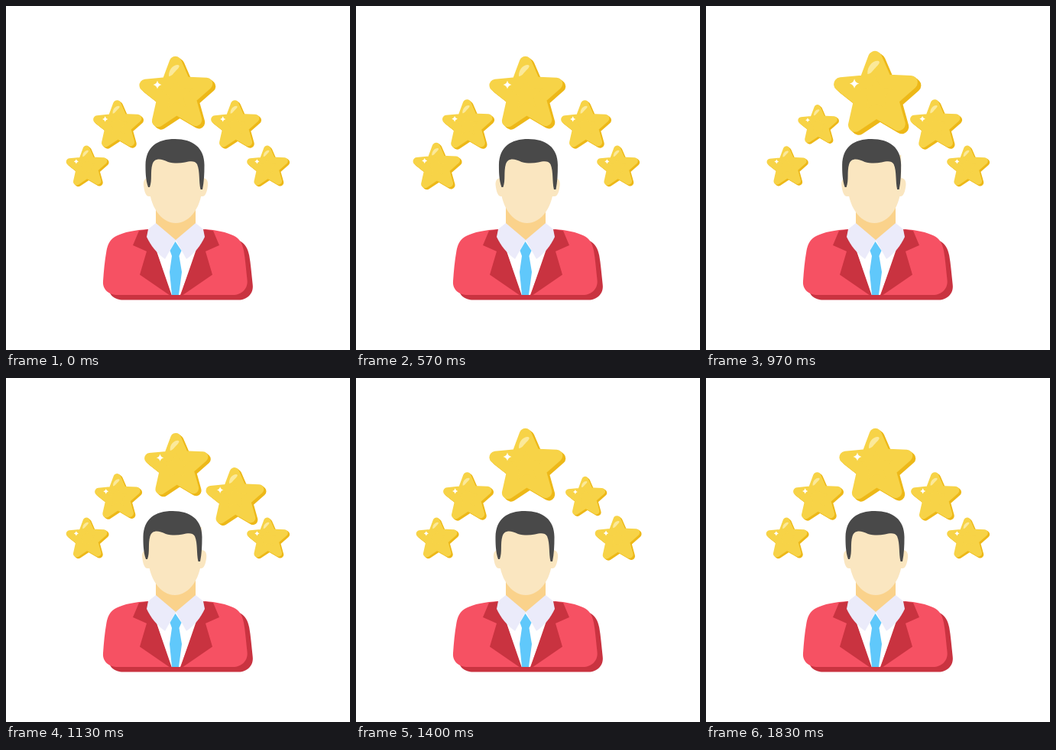
Write an HTML page that moves like this. It is 450 px wide and 450 px high and loops after 2 s.

```html
<!DOCTYPE html>
<html lang="en">
<head>
<meta charset="utf-8">
<title>Five star person</title>
<style>
  html, body { margin: 0; width: 100%; height: 100%; overflow: hidden; background: #fff; }
  svg { display: block; width: 100vw; height: 100vh; }
</style>
</head>
<body>
<svg viewBox="0 0 450 450">
  <defs>
    <path id="coat" d="M187 292C168 293 154 296 145 300.500C137 304.500 133.500 310 131.500 320C129 334 128 346 127 360C126 371 135 378 146 378H297C308 378 317 370 315.500 358C314 344 313 331 311 320C309 310 305.500 304.500 298 300.500C289 296 275 293 260 292Z"/>
    <path id="lapel" d="M187 292L174 294L166 313L184 321L175 351.500L215 379H217Z"/>
    <path id="collar" d="M196 284L222 306L208 331C197 323 189 313 184 302L186 292Z"/>
    <path id="ear" d="M192 226C184 223 179 226 180 235C181 243 183 250 188 249H192Z"/>
    <path id="body" stroke-width="16" stroke-linejoin="round"/>
    <g id="star">
      <g fill="#edb818" stroke="#edb818">
        <use href="#body" x="4" y="3.4"/>
        <use href="#body" x="2" y="1.7"/>
      </g>
      <use href="#body" fill="#f7d347" stroke="#f7d347"/>
      <path fill="#fbe99a" d="M-12 -21C-12.500 -30 -6 -36.500 0 -36C4 -35 0 -31 -3 -28C-6 -25 -8 -21 -12 -21Z"/>
      <path fill="#fff" d="M-27 -15.500Q-26 -11 -21.500 -10Q-26 -9 -27 -4.500Q-28 -9 -32.500 -10Q-28 -11 -27 -15.500Z"/>
    </g>
  </defs>

  <use href="#coat" x="7.200" y="6.600" fill="#c93340"/>
  <use href="#coat" fill="#f65163"/>
  <path fill="#fff" d="M187 292L216 378H228L260 292Z"/>
  <g fill="#c93340">
    <use href="#lapel"/>
    <use href="#lapel" transform="translate(445 0) scale(-1 1)"/>
  </g>
  <path fill="#fad28b" d="M196 255H248V285L222 307L196 285Z"/>
  <g fill="#ebebfa">
    <use href="#collar"/>
    <use href="#collar" transform="translate(444 0) scale(-1 1)"/>
  </g>
  <path fill="#60c8fb" d="M221.500 308L229.500 320L226.500 327L230 348L226 378H217L214 348L217 327L214.500 320Z"/>

  <g id="ears" fill="#fae6c0">
    <use href="#ear"/>
    <use href="#ear" transform="translate(444 0) scale(-1 1)"/>
  </g>
  <path id="face" fill="#fae6c0" d="M187 195H257V232C257 262 241 284 222 284C203 284 187 262 187 232Z"/>
  <path id="hair" fill="#494949" d="M186 237C182.500 227 182.500 216 182.500 208C183 184 198 174 221 174C244 174 259.500 185 259.500 208C259.500 220 259 230 257 240H254.500C252 229 254 217 250 207C247 202 241 203 234 204.500C227 206 219 206 212 204C202 199 194 199 191.500 207C188.500 217 191.500 228 188 237Z"/>
  <g id="stars"></g>
</svg>
<script>
const NS = 'http://www.w3.org/2000/svg';
const LOOP = 2000, FRAME = 1000 / 30, STAGGER = 200;
const PULSE = [[333, 1], [533, 1.2], [775, 0.8], [1000, 1]];
const SWAY = [[333, 0], [667, 5.6], [1000, -4.6], [1333, 0]];
// share of the sway, so the head seems to turn
const DEPTH = { hair: 1, ears: 0.6, face: 0.4 };
// centre x, centre y, size
const STARS = [
  [107, 209, 0.56], [147.5, 154.5, 0.66], [225, 113, 1],
  [301.5, 154.5, 0.66], [343.5, 209, 0.56]
];

const byId = id => document.getElementById(id);
const linear = p => p;
const smooth = p => (1 - Math.cos(Math.PI * p)) / 2;

function starPath(cx, cy, outer, inner, tilt) {
  const pts = [];
  for (let i = 0; i < 10; i++) {
    const a = (i * 36 - 90 + tilt) * Math.PI / 180;
    const r = i % 2 ? inner : outer;
    pts.push((cx + r * Math.cos(a)).toFixed(2) + ' ' + (cy + r * Math.sin(a)).toFixed(2));
  }
  return 'M' + pts.join('L') + 'Z';
}

function track(keys, t, ease) {
  if (t <= keys[0][0]) return keys[0][1];
  for (let i = 1; i < keys.length; i++) {
    const [t0, v0] = keys[i - 1], [t1, v1] = keys[i];
    if (t < t1) return v0 + (v1 - v0) * ease((t - t0) / (t1 - t0));
  }
  return keys[keys.length - 1][1];
}

byId('body').setAttribute('d', starPath(-2.3, 2.7, 42, 18.5, -1.5));
const stars = STARS.map(() => {
  const el = document.createElementNS(NS, 'use');
  el.setAttribute('href', '#star');
  return byId('stars').appendChild(el);
});

function draw(ms) {
  // motion advances in 30 fps steps
  const t = Math.floor((ms % LOOP + 4) / FRAME) * FRAME % LOOP;
  const sway = track(SWAY, t, smooth);
  for (const id in DEPTH) {
    byId(id).setAttribute('transform', `translate(${sway * DEPTH[id]} 0)`);
  }
  STARS.forEach(([x, y, size], i) => {
    const s = size * track(PULSE, t - i * STAGGER, linear);
    stars[i].setAttribute('transform', `translate(${x} ${y}) scale(${s})`);
  });
}

const start = performance.now();
function tick() {
  draw(performance.now() - start);
  requestAnimationFrame(tick);
}
tick();
</script>
</body>
</html>
```
